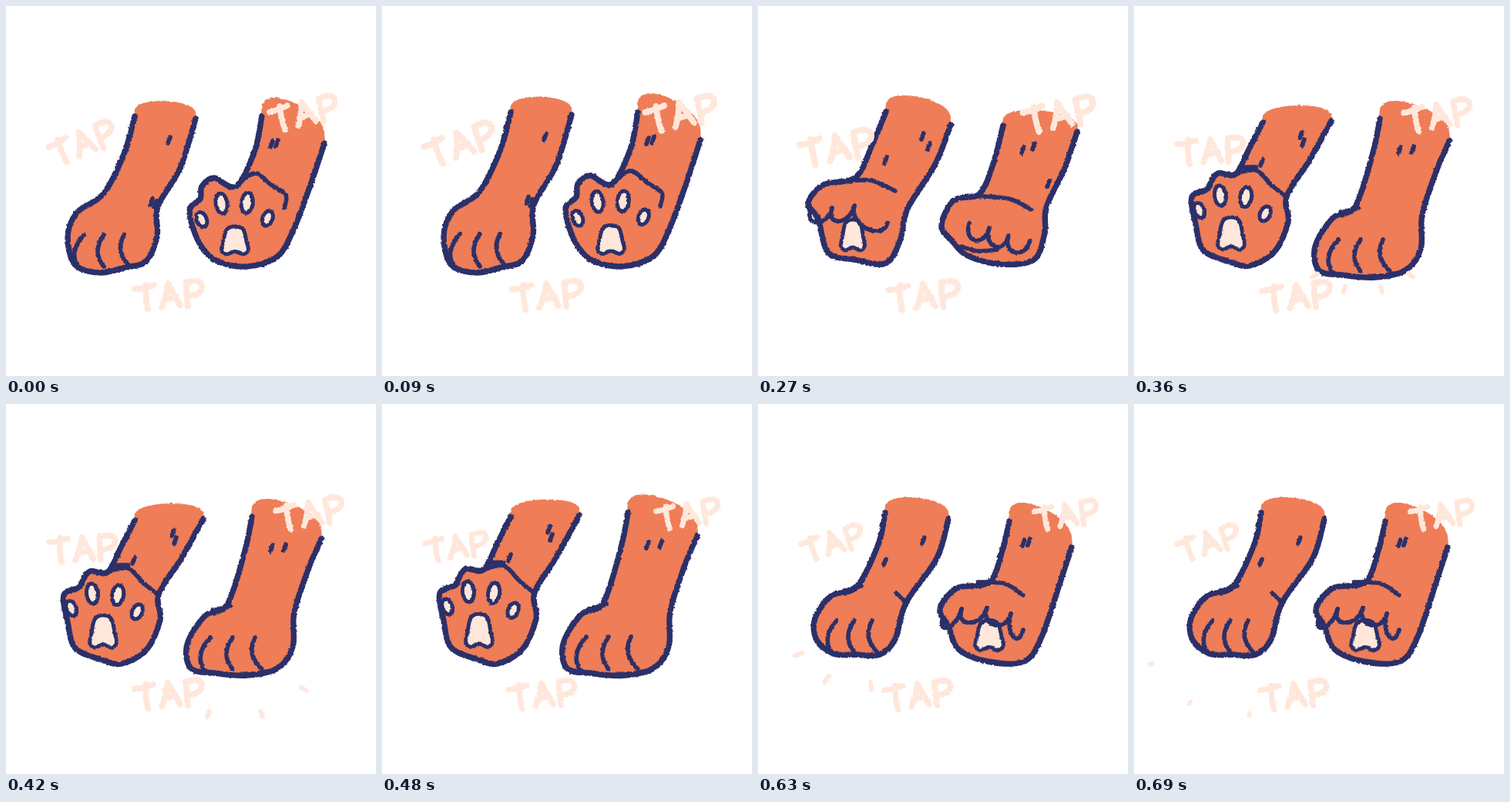
An HTML page that plays this animation: 480x480 px, repeating every 720 ms.

```html
<!DOCTYPE html>
<html lang="en">
<head>
<meta charset="utf-8">
<title>Tap tap</title>
<style>
html, body { margin: 0; width: 100%; height: 100%; overflow: hidden; background: #fff; }
svg { display: block; width: 100vw; height: 100vh; }
path, ellipse { stroke-linecap: round; stroke-linejoin: round; }
.fur { fill: #ef7d57; }
.ink { fill: none; stroke: #2b3069; stroke-width: 5.6; }
.edge { stroke-width: 7.4; }
.pad { fill: #ffe7db; stroke-width: 5; }
.word, .drop { fill: none; stroke: #ffe7db; stroke-width: 7.6; }
.drop { stroke-width: 6; }
</style>
</head>
<body>
<svg viewBox="0 0 480 480">
  <defs>
    <filter id="rough" filterUnits="userSpaceOnUse" x="0" y="0" width="480" height="480" color-interpolation-filters="sRGB">
      <feTurbulence type="fractalNoise" baseFrequency=".3" numOctaves="2" seed="4"/>
      <feDisplacementMap in="SourceGraphic" scale="3" xChannelSelector="R" yChannelSelector="G"/>
    </filter>
  </defs>
  <g id="stage" filter="url(#rough)"></g>
</svg>
<script>
const LOOP = 720, FLOOR = 345;
const stage = document.getElementById('stage');

// Key points of each edge run from the arm's left top around the paw to its right top.
// fan: x, y, gap of the toe lines; scallop: cusps between curled toes;
// pad: x, y, width, height; toes: turn of the toe pads; flecks: x, y of each.
const poses = [
  [{
    edge: '167 143 153 192 126 244 92 268 80 300 90 336 122 346 155 339 182 331 196 298 197 260 226 210 246 146',
    fan: [127, 297, 26], flecks: '213 170 190 250 195 253'
  }, {
    edge: '332 143 322 190 298 234 270 223 254 234 252 250 238 266 250 306 272 330 312 338 352 325 373 290 395 232 413 178',
    lines: ['298 234 322 217 344 232 363 245 361 262'],
    pad: [297, 304, 36, 36], toes: 0, flecks: '346 175 353 174'
  }],
  [{
    edge: '165 141 156 182 128 237 95 249 74 278 76 306 98 324 125 325 158 325 178 305 192 258 232 200 247 149',
    lines: ['112 242 134 236', '179 245 191 257'], fan: [125, 281, 23], flecks: '216 173 166 201'
  }, {
    edge: '326 152 317 190 300 231 258 239 236 266 247 288 260 318 298 334 345 334 368 302 393 228 407 186',
    lines: ['285 231 320 233 344 248'], pad: [300, 300, 38, 39],
    scallop: '240 276 264 266 297 264 328 272 344 293', flecks: '346 176 353 175'
  }],
  [{
    edge: '166 137 148 180 127 222 85 232 65 256 78 276 91 320 125 329 165 334 184 305 194 263 230 205 250 154',
    lines: ['105 229 145 226 178 240'], pad: [123, 297, 32, 40],
    scallop: '68 262 96 262 125 259 168 281', flecks: '167 196 215 165 223 178'
  }, {
    edge: '318 155 305 205 287 244 254 252 238 285 252 305 272 324 315 335 358 329 372 294 374 261 398 210 414 163',
    lines: ['270 246 325 250 354 264', '264 312 285 318 310 316'],
    scallop: '274 282 300 288 325 298 353 304', flecks: '345 183 359 178 378 227'
  }],
  [{
    edge: '167 151 149 186 132 218 109 217 99 230 95 238 75 248 80 283 90 317 125 332 150 337 182 319 200 280 198 247 227 201 256 149',
    lines: ['132 218 158 213 178 232 198 248', '137 209 158 209'],
    pad: [126, 295, 36, 42], toes: 4, flecks: '218 163 221 173 167 199'
  }, {
    edge: '319 146 310 190 287 260 258 275 235 312 240 343 270 349 312 352 352 343 372 315 374 270 393 212 409 175',
    lines: ['268 268 291 262'], fan: [294, 303, 29], flecks: '346 183 363 182'
  }]
];
const order = [0, 0, 1, 2, 3, 3, 2, 1];

// Centre, turn and scale of each word; u is loop progress, s and c its sine and cosine.
const words = [
  (u, s, c) => [99 + 3 * s, 182.5 - 5 * c, -11 - 9 * c, .98 + .09 * s],
  (u, s) => [386 + 16 * u, 139 + 6 * u, -11 + 5 * u, .98 + .07 * s],
  (u, s) => [211 + 4 * s, 375 + 3 * u, -3 - 2 * u, 1 + .03 * s]
];
const wordTimes = [0, 90, 210, 360, 480, 540, 600];
const TAP = 'M2 10Q14 10 27 6M17 5Q15 20 18 37M36 35Q43 22 46 5Q53 20 60 34M41 25L56 23M70 36L69 5Q90 0 90 12Q88 22 70 23';

const splashes = [
  { start: 360, x: 297, y: 325, count: 4, angle: 147 },
  { start: 600, x: 137, y: 303, count: 3, angle: 160 }
];

const nums = text => text.split(' ').map(Number);
const rad = deg => deg * Math.PI / 180;

function add(tag, parent, attrs = {}) {
  const el = document.createElementNS('http://www.w3.org/2000/svg', tag);
  for (const k in attrs) el.setAttribute(k, attrs[k]);
  return parent.appendChild(el);
}

function points(text) {
  const n = nums(text), p = [];
  for (let i = 0; i < n.length; i += 2) p.push([n[i], n[i + 1]]);
  return p;
}

// Catmull-Rom curve through points.
function curve(p, closed = false) {
  const at = i => closed ? p[(i + p.length) % p.length] : p[Math.max(0, Math.min(p.length - 1, i))];
  let d = 'M' + p[0];
  for (let i = 0; i < p.length - !closed; i++) {
    const [a, b, c, e] = [at(i - 1), at(i), at(i + 1), at(i + 2)];
    d += 'C' + [b[0] + (c[0] - a[0]) / 6, b[1] + (c[1] - a[1]) / 6,
      c[0] - (e[0] - b[0]) / 6, c[1] - (e[1] - b[1]) / 6, ...c];
  }
  return d;
}

// Rounded arm end from right to left, higher when the arm is cut at a slant.
function dome([x0, y0], [x1, y1]) {
  const height = 20 + Math.abs(y1 - y0) * .45;
  let d = '';
  for (let a = 0; a <= 180; a += 15) {
    const k = Math.cos(rad(a)) / 2;
    d += `L${(x0 + x1) / 2 + (x1 - x0) * k * 1.03} ${(y0 + y1) / 2 + (y1 - y0) * k - height * Math.sin(rad(a)) ** .6}`;
  }
  return d;
}

function padShape([x, y, w, h]) {
  const half = [[0, -.5], [-.3, -.38], [-.42, .05], [-.48, .35], [-.3, .5], [0, .4]];
  const mirror = half.slice(1, -1).reverse().map(([a, b]) => [-a, b]);
  return curve([...half, ...mirror].map(([a, b]) => [x + a * w, y + b * h]), true);
}

function drawLimb({ edge, lines = [], fan, scallop, pad, toes, flecks }) {
  const g = add('g', stage), p = points(edge), outline = curve(p);
  const ink = (d, extra = '') => add('path', g, { class: 'ink ' + extra, d });
  add('path', g, { class: 'fur', d: outline + dome(p[0], p[p.length - 1]) });
  ink(outline, 'edge');
  if (pad) ink(padShape(pad), 'pad');
  if (toes !== undefined) {
    for (let i = 0; i < 4; i++) {
      const angle = -148 + 38 * i + toes, big = i % 3 ? 1 : 0;
      const cx = pad[0] + 51 * Math.cos(rad(angle)), cy = pad[1] + 51 * Math.sin(rad(angle));
      add('ellipse', g, { class: 'ink pad', cx, cy, rx: 6.5 + big, ry: 10 + 3 * big,
        transform: `rotate(${(angle + 90) * .4} ${cx} ${cy})` });
    }
  }
  if (fan) {
    const [x, y, gap] = fan;
    for (const i of [-1, 0, 1])
      ink(`M${x + i * gap} ${y}q${i * gap * .15 - 16} 22 ${i * gap * .3} 41`);
  }
  if (scallop) {
    points(scallop).forEach(([x, y], i, all) => {
      if (i) ink(`M${all[i - 1]}C${all[i - 1][0] - 8} ${all[i - 1][1] + 25} ${x - 6} ${y + 25} ${x} ${y}`);
    });
  }
  for (const l of lines) ink(curve(points(l)));
  for (const [x, y] of points(flecks)) ink(`M${x} ${y}l-3 8`);
  return g;
}

const pairs = poses.map(pair => pair.map(drawLimb));
const wordEls = words.map(() => add('path', stage, { class: 'word', d: TAP }));
const dropEls = [0, 1, 2, 3].map(() => add('path', stage, { class: 'drop' }));

// Drops fly out along an ellipse that widens in four steps.
function drawDrops(t) {
  const splash = splashes.find(s => t >= s.start && t < s.start + 120);
  dropEls.forEach((el, i) => {
    if (!splash || i >= splash.count) return el.setAttribute('d', '');
    const step = Math.floor((t - splash.start) / 30), k = step / 3;
    const a = rad(splash.angle - 38 * i), cos = Math.cos(a), sin = Math.sin(a);
    const x = splash.x + (74 + 48 * k) * cos, y = splash.y + (45 + 55 * k) * sin;
    const half = 1 + 4 * Math.sin(Math.PI * (.25 + .75 * k));
    el.setAttribute('d', `M${x - half * cos} ${y - half * sin}L${x + half * cos} ${y + half * sin}`);
  });
}

function draw(t) {
  const beat = Math.floor(t / 90), current = order[beat];
  // The second beat of a hold stretches the arms a little.
  const stretch = beat && order[beat - 1] === current ? 1.025 : 1;
  pairs.forEach((pair, i) => pair.forEach(g => {
    g.style.display = i === current ? '' : 'none';
    g.setAttribute('transform', `translate(0 ${FLOOR * (1 - stretch)}) scale(1 ${stretch})`);
  }));
  const u = wordTimes.filter(w => w <= t).pop() / LOOP, phase = 2 * Math.PI * u;
  wordEls.forEach((el, i) => {
    const [x, y, turn, scale] = words[i](u, Math.sin(phase), Math.cos(phase));
    el.setAttribute('transform', `translate(${x} ${y}) rotate(${turn}) scale(${scale}) translate(-46 -20)`);
  });
  drawDrops(t);
}

const start = performance.now();
let shown = -1;
(function loop() {
  const tick = Math.floor((performance.now() - start) % LOOP / 30);
  if (tick !== shown) draw((shown = tick) * 30);
  requestAnimationFrame(loop);
})();
</script>
</body>
</html>
```
